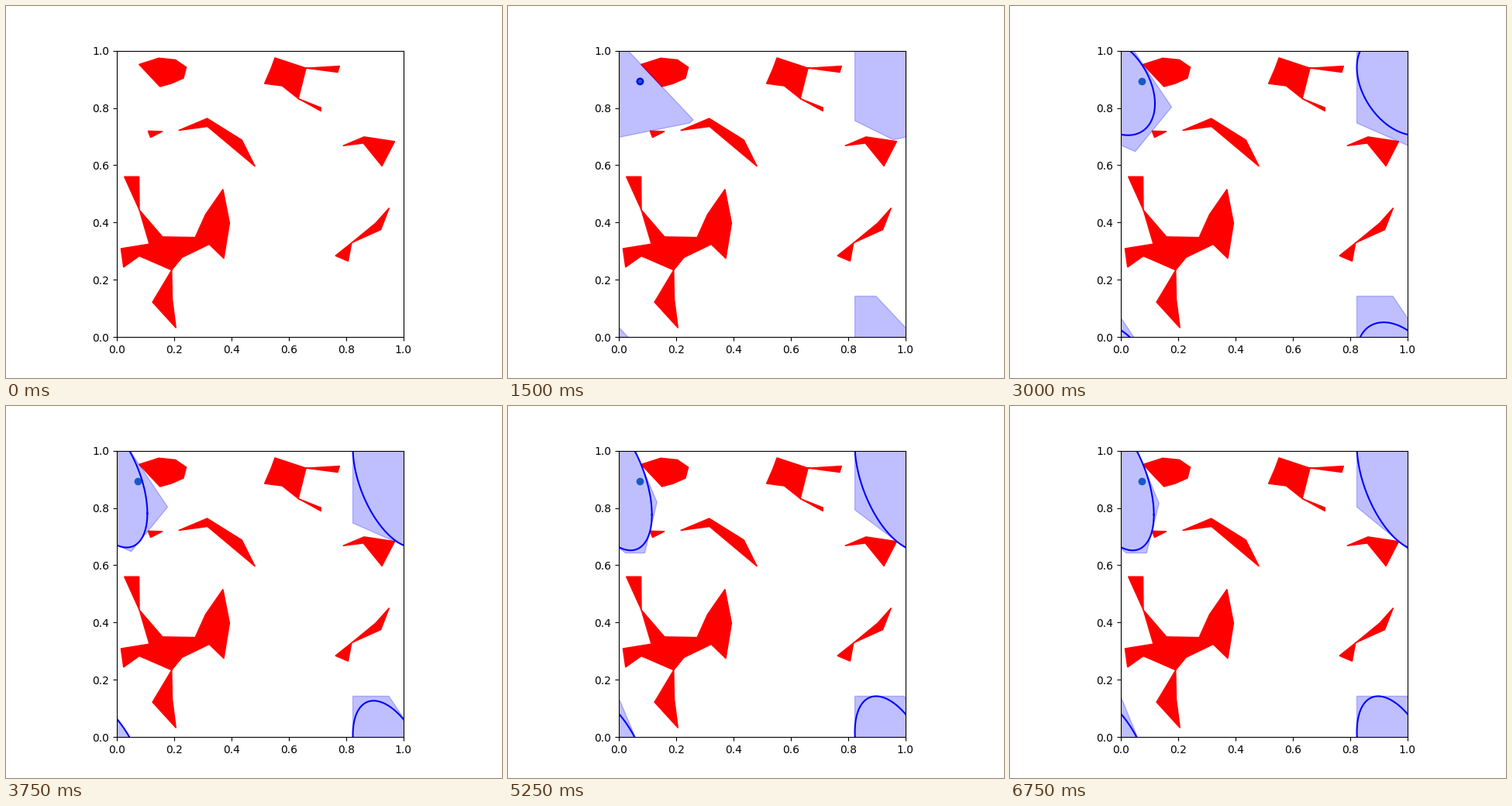
Write a matplotlib script that moves like this. It is 640 px wide and 480 px high and loops after 8000 ms.

```python
"""Growing a convex free region around a seed point on a unit torus.

Each round separates the obstacles from the current ellipse by tangent planes,
then fits the largest ellipse inside the polygon those planes leave.
"""
import itertools

import matplotlib.pyplot as plt
import numpy as np
from matplotlib.animation import FuncAnimation

INTERVAL, FRAMES, FRAMES_PER_STEP = 250, 32, 3
ROUNDS = 4
LAST_STEP = 2 * ROUNDS + 1
SEED = np.array([0.0735, 0.8927])
REACH, START_RADIUS = 0.25, 0.01

# Outline corners of each obstacle; pinched outlines revisit a corner.
OBSTACLES = [np.array(corners) for corners in (
    [(.077, .952), (.146, .974), (.204, .968), (.242, .942), (.232, .904),
     (.189, .885), (.150, .8745)],
    [(.5515, .975), (.660, .939), (.777, .946), (.7705, .9245), (.660, .939),
     (.633, .8325), (.712, .801), (.712, .789), (.633, .8325), (.577, .877),
     (.515, .885), (.538, .938)],
    [(.1085, .7195), (.159, .718), (.117, .697)],
    [(.215, .7215), (.315, .7635), (.436, .688), (.482, .596), (.316, .735)],
    [(.789, .668), (.8625, .699), (.9695, .683), (.925, .597), (.860, .677)],
    [(.0255, .560), (.077, .560), (.078, .444), (.159, .350), (.273, .348),
     (.309, .428), (.370, .516), (.393, .398), (.373, .2745), (.322, .324),
     (.227, .278), (.191, .234), (.193, .133), (.206, .032), (.124, .122),
     (.191, .234), (.078, .283), (.023, .244), (.014, .309), (.113, .325),
     (.078, .444)],
    [(.9505, .451), (.921, .375), (.819, .329), (.807, .265), (.7625, .284),
     (.819, .329), (.903, .398)],
)]

VIEW_SHIFTS = list(itertools.product((0, 1), (0, -1)))
ANGLES = np.linspace(0, 2 * np.pi, 200)
CIRCLE = np.array([np.cos(ANGLES), np.sin(ANGLES)])


def nearest_point(corners):
    """Point of a closed outline nearest to the origin."""
    sides = np.roll(corners, -1, axis=0) - corners
    along = -(corners * sides).sum(1) / (sides ** 2).sum(1)
    points = corners + np.clip(along, 0, 1)[:, None] * sides
    return points[np.argmin((points ** 2).sum(1))]


def is_beyond(corners, plane):
    normal, offset = plane
    return np.all(corners @ normal >= offset - 1e-9)


def separating_planes(root, centre):
    """Planes (normal, offset) around the ellipse: the box, then obstacles."""
    planes = [(n, n @ SEED + REACH) for n in np.vstack([np.eye(2), -np.eye(2)])]
    copies = [corners + shift for corners in OBSTACLES
              for shift in itertools.product((-1, 0, 1), repeat=2)]
    copies = [c for c in copies if not any(is_beyond(c, p) for p in planes)]
    inverse = np.linalg.inv(root)
    while copies:
        touches = [nearest_point((c - centre) @ inverse.T) for c in copies]
        touch = min(touches, key=np.linalg.norm)
        normal = inverse.T @ touch
        normal /= np.linalg.norm(normal)
        plane = normal, normal @ (root @ touch + centre)
        planes.append(plane)
        copies = [c for c, t in zip(copies, touches)
                  if t is not touch and not is_beyond(c, plane)]
    return planes


def clip(corners, plane):
    normal, offset = plane
    kept = []
    for p, q in zip(corners, corners[1:] + corners[:1]):
        gap_p, gap_q = offset - normal @ p, offset - normal @ q
        if gap_p >= 0:
            kept.append(p)
        if gap_p * gap_q < 0:
            kept.append(p + (q - p) * gap_p / (gap_p - gap_q))
    return kept


def polygon_of(planes):
    square = [SEED + REACH * np.array(c)
              for c in ((-1, -1), (1, -1), (1, 1), (-1, 1))]
    for plane in planes:
        square = clip(square, plane)
    return np.array(square)


def largest_ellipse(planes, root, centre):
    """Barrier Newton method over z = (root00, root10, root11, cx, cy)."""
    normals = np.array([n for n, _ in planes])
    offsets = np.array([b for _, b in planes])
    shift = np.zeros((len(planes), 5))
    shift[:, 3:] = normals
    spread = np.zeros((len(planes), 2, 5))
    spread[:, 0, :2] = normals
    spread[:, 1, 2] = normals[:, 1]

    def slack(z):
        return offsets - shift @ z - np.linalg.norm(spread @ z, axis=1)

    def cost(z, weight):
        gaps = slack(z)
        if min(z[0], z[2], gaps.min()) <= 0:
            return np.inf
        return -np.log(z[0] * z[2]) - weight * np.log(gaps).sum()

    z = np.array([*(0.9 * root[[0, 1, 1], [0, 0, 1]]), *centre])
    for weight in 0.2 ** np.arange(9):
        for _ in range(30):
            gaps, reach = slack(z), spread @ z
            length = np.linalg.norm(reach, axis=1)
            unit = reach / length[:, None]
            pull = np.einsum("nij,ni->nj", spread, unit)
            slope = shift + pull
            curve = (np.einsum("nij,nik->njk", spread, spread)
                     - pull[:, :, None] * pull[:, None]) / length[:, None, None]
            inv = np.array([1 / z[0], 0, 1 / z[2], 0, 0])
            gradient = -inv + weight * (slope / gaps[:, None]).sum(0)
            scaled = slope / gaps[:, None]
            hessian = np.diag(inv ** 2) + weight * (
                scaled.T @ scaled + (curve / gaps[:, None, None]).sum(0))
            step = np.linalg.solve(hessian, -gradient)
            if -gradient @ step < 1e-10:
                break
            size, now = 1.0, cost(z, weight)
            while cost(z + size * step, weight) > now and size > 1e-9:
                size /= 2
            if size <= 1e-9:
                break
            z = z + size * step
    return np.array([[z[0], 0], [z[1], z[2]]]), z[3:]


def outline_of(root, centre):
    return (root @ CIRCLE).T + centre


ellipse = START_RADIUS * np.eye(2), SEED
polygons, ellipses = [], [outline_of(*ellipse)]
for _ in range(ROUNDS):
    planes = separating_planes(*ellipse)
    polygons.append(polygon_of(planes))
    ellipse = largest_ellipse(planes, *ellipse)
    ellipses.append(outline_of(*ellipse))

fig, ax = plt.subplots(figsize=(6.4, 4.8), dpi=100)
ax.set(xlim=(0, 1), ylim=(0, 1), aspect="equal")
for obstacle in OBSTACLES:
    ax.fill(*obstacle.T, color="red")
dot = ax.scatter(*SEED)
regions = [ax.fill([0], [0], color="blue", alpha=0.25)[0] for _ in VIEW_SHIFTS]
outlines = [ax.plot([], [], color="blue")[0] for _ in VIEW_SHIFTS]


def update(frame):
    # Steps: bare map, seed, then polygon and ellipse in turn.
    step = min(frame // FRAMES_PER_STEP, LAST_STEP)
    polygon, oval = step // 2 - 1, (step - 1) // 2
    dot.set_visible(step > 0)
    for shift, region, outline in zip(VIEW_SHIFTS, regions, outlines):
        region.set_visible(polygon >= 0)
        outline.set_visible(oval >= 0)
        if polygon >= 0:
            region.set_xy(polygons[polygon] + shift)
        if oval >= 0:
            outline.set_data(*(ellipses[oval] + shift).T)
    return [dot, *regions, *outlines]


anim = FuncAnimation(fig, update, frames=FRAMES, interval=INTERVAL,
                     init_func=lambda: update(0), repeat=True, repeat_delay=0)
plt.show()
```
